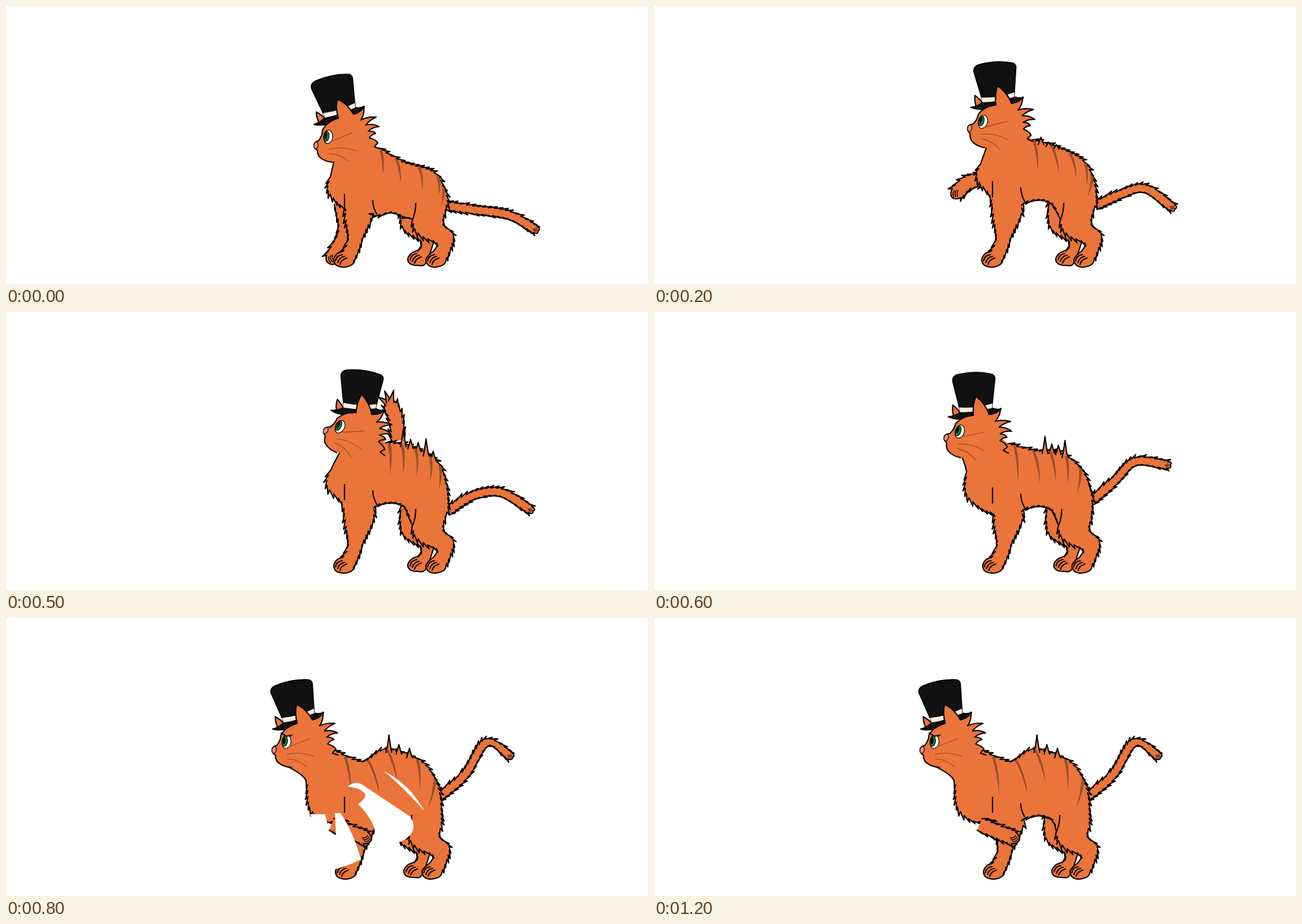
An HTML page with a canvas that plays this animation: 1136 px wide and 493 px high, repeating every 1300 ms.

```html
<!DOCTYPE html>
<html lang="en">
<head>
<meta charset="utf-8">
<title>Cat in a top hat</title>
<style>
html, body { margin: 0; width: 100%; height: 100%; overflow: hidden; background: #fff; }
canvas { display: block; }
</style>
</head>
<body>
<canvas id="stage" width="1136" height="493"></canvas>
<script>
const ctx = document.getElementById('stage').getContext('2d');
const ORANGE = '#ea7439', BLACK = '#050303';

// head: ear tip and tilt; back, chest, tail, arm: key points; belly: height of the arch;
// bristles: height, start, count; stripes: start, spacing, lean, length; shift: hind and front leg.
const stand = {
  head: [586, 165, 0], shift: [0, 0], belly: [369], claws: [0],
  back: [660,252, 700,276, 757,295, 775,325, 781,345],
  chest: [590,352, 570,327, 574,303, 580,277],
  tail: [779,354, 825,361, 890,371, 936,396],
  arm: [592,350, 600,400, 577,447],
  bristles: [0, 0.4, 3], stripes: [0.1, 0.7, 8, 48]
};
const lift = {
  ...stand, head: [606, 143, 7], belly: [350],
  back: [672,245, 712,263, 755,276, 776,307, 783,345],
  chest: [592,333, 574,313, 578,288, 588,253],
  tail: [780,356, 828,344, 868,336, 913,371],
  arm: [586,338, 561,368, 563,397],
  stripes: [0.1, 0.7, 13, 50]
};
const reach = {
  ...lift, head: [610, 140, 10.5], belly: [343],
  back: [666,230, 715,238, 762,272, 778,308, 782,345],
  chest: [597,338, 569,297, 578,272, 588,250],
  tail: [781,353, 825,323, 870,312, 920,342],
  arm: [592,274, 550,258, 508,267],
  bristles: [20, 0.45, 3], stripes: [0.1, 0.65, 15, 58]
};
const windUp = {
  ...reach, head: [629, 146, 20], belly: [341], claws: [18],
  back: [672,232, 715,238, 762,265, 778,304, 782,345],
  chest: [594,337, 568,308, 575,280, 590,250],
  tail: [781,354, 825,326, 875,320, 927,350],
  arm: [694,228, 690,190, 680,165],
  bristles: [27, 0.75, 5], stripes: [0.2, 0.5, 2, 58]
};
const land = {
  head: [514, 153, 1.5], shift: [-7, 3], belly: [353], claws: [0],
  back: [580,235, 630,255, 672,234, 735,255, 765,302],
  chest: [565,360, 537,335, 531,288, 500,264],
  tail: [763,320, 812,278, 850,221, 891,244],
  arm: [576,366, 610,380, 636,390],
  bristles: [28, 2.1, 3], stripes: [0.45, 0.8, 21, 66]
};
const strike = { ...land, head: [510, 153, 2], tail: [763,320, 806,272, 828,211, 888,192] };

const poses = [stand, lift, reach, windUp, strike, land];
const schedule = [0, 1, 1.5, 2, 2.5, 3, 3.5, 4, 5, 5, 5, 5, 5];

const headShape = new Path2D(`M580 277Q566 277 556 269Q551 264 551 256Q544 252 545 245Q547 240 553 239
  Q560 230 560 220Q568 205 588 199Q583 180 586 165Q604 173 615 192Q630 188 633 178Q635 192 628 202
  Q640 196 655 197Q642 203 637 211Q650 208 660 214Q648 215 641 222Q650 221 654 226Q646 228 643 234
  Q655 237 658 243Q654 246 652 250L662 253`);
const farEar = new Path2D('M554 207Q549 197 549 188Q560 194 567 201');
const crown = new Path2D('M566 200L541 147Q538 138 548 133Q575 121 604 121Q612 121 613 128L618 184Z');
const band = new Path2D('M561 190Q592 186 617 172L618 180Q592 193 564 198Z');
const brim = new Path2D('M545 210Q558 206 564 198Q594 192 618 180Q628 182 634 178Q633 190 615 192L590 200Q565 215 545 210Z');
const whiskers = new Path2D('M572 242L612 225M572 254Q595 248 619 257M572 262Q590 262 607 276');

const swooshes = {
  4: new Path2D(`M530 346L565 345L573 335L566 326L588 325Q612 341 640 375L643 352L664 350L672 362L655 400
    L650 440L622 449L606 457L588 461L570 466L530 440ZM604 310Q606 301 615 302Q620 305 617 311Q609 318 604 310Z
    M625 329Q622 318 632 316Q638 317 642 323L666 351L650 357Z`),
  5: new Path2D(`M668 271Q715 295 740 342Q705 302 668 271ZM605 299Q615 289 628 294Q670 322 715 352Q727 370 715 385
    Q705 395 694 398L660 402L653 378Q648 355 623 330Q640 318 634 310Q625 301 605 299Z
    M582 346L592 346Q615 380 628 428Q605 440 580 446L572 420L584 385ZM538 348L565 348L571 376L556 390Z`)
};

const mix = (a, b, k) => Object.fromEntries(Object.keys(a).map(
  key => [key, a[key].map((v, i) => v + (b[key][i] - v) * k)]));
const random = (a, b) => { const v = Math.sin(a * 12.9 + b * 78.2) * 43758; return v - Math.floor(v); };

// Turns a flat list into [x, y, fur] points; negative fur leans against the path.
function points(flat, fur = 0, dx = 0) {
  const out = [];
  for (let i = 0; i < flat.length; i += 2) out.push([flat[i] + dx, flat[i + 1], fur]);
  return out;
}

// Point on a Catmull-Rom curve; u counts key points from the start.
function along(p, u) {
  const i = Math.min(Math.floor(u), p.length - 2), t = u - i;
  const a = p[Math.max(i - 1, 0)], b = p[i], c = p[i + 1], d = p[Math.min(i + 2, p.length - 1)];
  return [0, 1].map(j => b[j] + t * ((c[j] - a[j]) / 2 + t * (a[j] - 2.5 * b[j] + 2 * c[j] - d[j] / 2
    + t * (1.5 * (b[j] - c[j]) + (d[j] - a[j]) / 2))));
}

function paint(path, filled = path) {
  ctx.fillStyle = ORANGE;
  ctx.strokeStyle = BLACK;
  ctx.lineWidth = 2.2;
  if (filled) ctx.fill(filled);
  ctx.stroke(path);
}

// Furry open outline; the fill also takes in the inner point, which gets no line.
function outline(p, inner) {
  const path = new Path2D();
  let last = p[0];
  path.moveTo(last[0], last[1]);
  for (let i = 1; i < p.length; i++) {
    const fur = p[i][2];
    const length = Math.hypot(p[i][0] - p[i - 1][0], p[i][1] - p[i - 1][1]);
    const steps = fur ? Math.max(1, Math.round(length / 9)) : 6;
    for (let k = 1; k <= steps; k++) {
      const next = along(p, i - 1 + k / steps);
      if (fur) {
        const dx = next[0] - last[0], dy = next[1] - last[1], d = Math.hypot(dx, dy) || 1;
        const size = Math.abs(fur) * (0.4 + 0.8 * random(i, k)), lean = 5 * Math.sign(fur);
        const root = fur > 0 ? next : last;
        path.lineTo(root[0] + (dy * size + dx * lean) / d, root[1] + (lean * dy - dx * size) / d);
      }
      path.lineTo(next[0], next[1]);
      last = next;
    }
  }
  const filled = new Path2D(path);
  if (inner) filled.lineTo(...inner);
  paint(path, filled);
}

function line(x, y, u, v) {
  paint(new Path2D(`M${x} ${y}Q${x} ${(y + v) / 2} ${u} ${v}`), null);
}

function spike(x, y, angle, width, length) {
  ctx.save();
  ctx.translate(x, y);
  ctx.rotate(angle);
  paint(new Path2D(`M-3 ${-width}Q${length * 0.3} ${-width * 0.5} ${length} 0Q${length * 0.3} ${width * 0.5} -3 ${width}`));
  ctx.restore();
}

function toes(x, y, angle = 0, size = 1) {
  ctx.save();
  ctx.translate(x, y);
  ctx.rotate(angle);
  ctx.scale(size, size);
  for (let i = 0; i < 3; i++) {
    const s = i * 4;
    paint(new Path2D(`M${13 + s} ${i * 3 - 9}Q${3 + s} ${s - 8} ${1 + s} ${2 + i * 3}`), null);
  }
  ctx.restore();
}

function limb(flat, radius, fur, claws = 0) {
  const mid = points(flat), n = mid.length - 1, upper = [], lower = [];
  let dx, dy;
  mid.forEach(([x, y], i) => {
    const a = mid[Math.max(i - 1, 0)], b = mid[Math.min(i + 1, n)];
    const d = Math.hypot(b[0] - a[0], b[1] - a[1]) || 1;
    dx = (b[0] - a[0]) / d;
    dy = (b[1] - a[1]) / d;
    upper.push([x + dy * radius, y - dx * radius, fur]);
    lower.unshift([x - dy * radius, y + dx * radius, i === n ? 0 : -fur]);
  });
  const [x, y] = mid[n], angle = Math.atan2(dy, dx);
  outline([...upper, [x + dx * radius, y + dy * radius, 0], ...lower]);
  if (claws) {
    for (let i = -1; i <= 1; i++) {
      const a = angle + i * 0.6;
      spike(x + Math.cos(a) * radius * 0.8, y + Math.sin(a) * radius * 0.8, a, 5, claws);
    }
  } else {
    toes(x + dx * radius * 0.8, y + dy * radius * 0.8, angle + Math.PI, radius / 16);
  }
}

function drawBristles(back, [height, start, count]) {
  for (let i = 0; height && i < count; i++) {
    const [x, y] = along(back, start + i * 0.27);
    spike(x, y + 1, -Math.PI / 2, 5, height * (i % 3 ? 0.5 : 1));
  }
}

function drawStripes(back, [start, spacing, lean, length]) {
  ctx.fillStyle = '#99502c';
  for (let i = 0; i < 5; i++) {
    const [x, y] = along(back, start + i * spacing);
    const u = x + lean * Math.sin((i + 0.7) * Math.PI / 4), v = y + length - 4 * i;
    const cx = (x + u) / 2 + 4, cy = (y + v) / 2 - 4;
    ctx.fill(new Path2D(`M${x - 2} ${y}Q${cx - 2} ${cy} ${u} ${v}Q${cx + 3} ${cy} ${x + 3} ${y + 1}`));
  }
}

function oval(color, x, y, rx, ry, outlined) {
  ctx.beginPath();
  ctx.ellipse(x, y, rx, ry, 0.1, 0, 7);
  ctx.fillStyle = color;
  ctx.fill();
  ctx.lineWidth = 1.2;
  if (outlined) ctx.stroke();
}

function drawHead([x, y, tilt], angry) {
  ctx.save();
  ctx.translate(x, y);
  ctx.rotate(tilt * Math.PI / 180);
  ctx.translate(-586, -165);
  paint(farEar);
  ctx.fillStyle = '#111';
  for (const part of [crown, brim]) {
    ctx.fill(part);
    ctx.stroke(part);
  }
  ctx.fillStyle = '#fdeee6';
  ctx.fill(band);
  paint(headShape);
  oval('#e98b8b', 548.5, 247, 3.8, 6, true);
  oval('#fff', 570, 232, 8, 12, true);
  oval('#16843a', 567, 231, 4.8, 9, true);
  oval('#000', 566, 230, 2.4, 6);
  if (angry) paint(new Path2D('M560 217L570 222L579 220'));
  ctx.strokeStyle = '#a5532a';
  ctx.lineWidth = 1.4;
  ctx.stroke(whiskers);
  ctx.restore();
}

function drawCat(pose, landed) {
  const [hind, fore] = pose.shift, belly = pose.belly[0], back = points(pose.back, 5);
  const drawArm = () => limb(pose.arm, 11, 5, pose.claws[0]);
  limb(pose.tail, 6.5, 4);
  if (!landed) drawArm();
  outline([
    ...points([757,418, 743,456, 728,460, 715,457, 711,448, 718,438, 733,430], 0, hind),
    ...points([733,415, 706,398, 699,380, 699,345], -5, hind)
  ], [745 + hind, 345]);
  outline([
    ...back,
    ...points([777,362, 773,387, 791,405, 787,428, 780,446], 5, hind),
    ...points([775,458, 760,463, 748,460, 743,450, 750,440, 758,433, 762,420], 0, hind),
    ...points([738,409, 723,395, 719,378], -5, hind),
    ...points([706, belly + 5, 682, belly - 4, 654, belly + 3], 4),
    ...points([650,368, 641,388, 630,412, 624,432, 616,450], 5, fore),
    ...points([613,458, 600,463, 585,460, 580,450, 586,439, 598,433], 0, fore),
    ...points([606,413, 602,380, 599,358], -5, fore),
    ...points(pose.chest.slice(0, 6), -6), ...points(pose.chest.slice(6))
  ], [pose.head[0] + 12, pose.head[1] + 45]);
  drawBristles(back, pose.bristles);
  drawStripes(back, pose.stripes);
  line(599, belly - 35, 599, belly - 8);
  line(649, belly - 24, 656, belly);
  line(725 + hind, 350, 719 + hind, 380);
  toes(582 + fore, 450);
  toes(745 + hind, 450);
  toes(714 + hind, 448);
  if (landed) drawArm();
  drawHead(pose.head, landed);
}

function draw(time) {
  const step = schedule[Math.floor(time / 100)], index = Math.floor(step);
  ctx.fillStyle = '#fff';
  ctx.fillRect(0, 0, 1136, 493);
  drawCat(mix(poses[index], poses[Math.ceil(step)], step - index), step >= 4);
  if (time < 900 && swooshes[step]) {
    ctx.fillStyle = '#fff';
    ctx.fill(swooshes[step]);
  }
}

ctx.lineJoin = ctx.lineCap = 'round';
const start = performance.now();
function tick() {
  draw((performance.now() - start) % 1300);
  requestAnimationFrame(tick);
}
tick();
</script>
</body>
</html>
```
